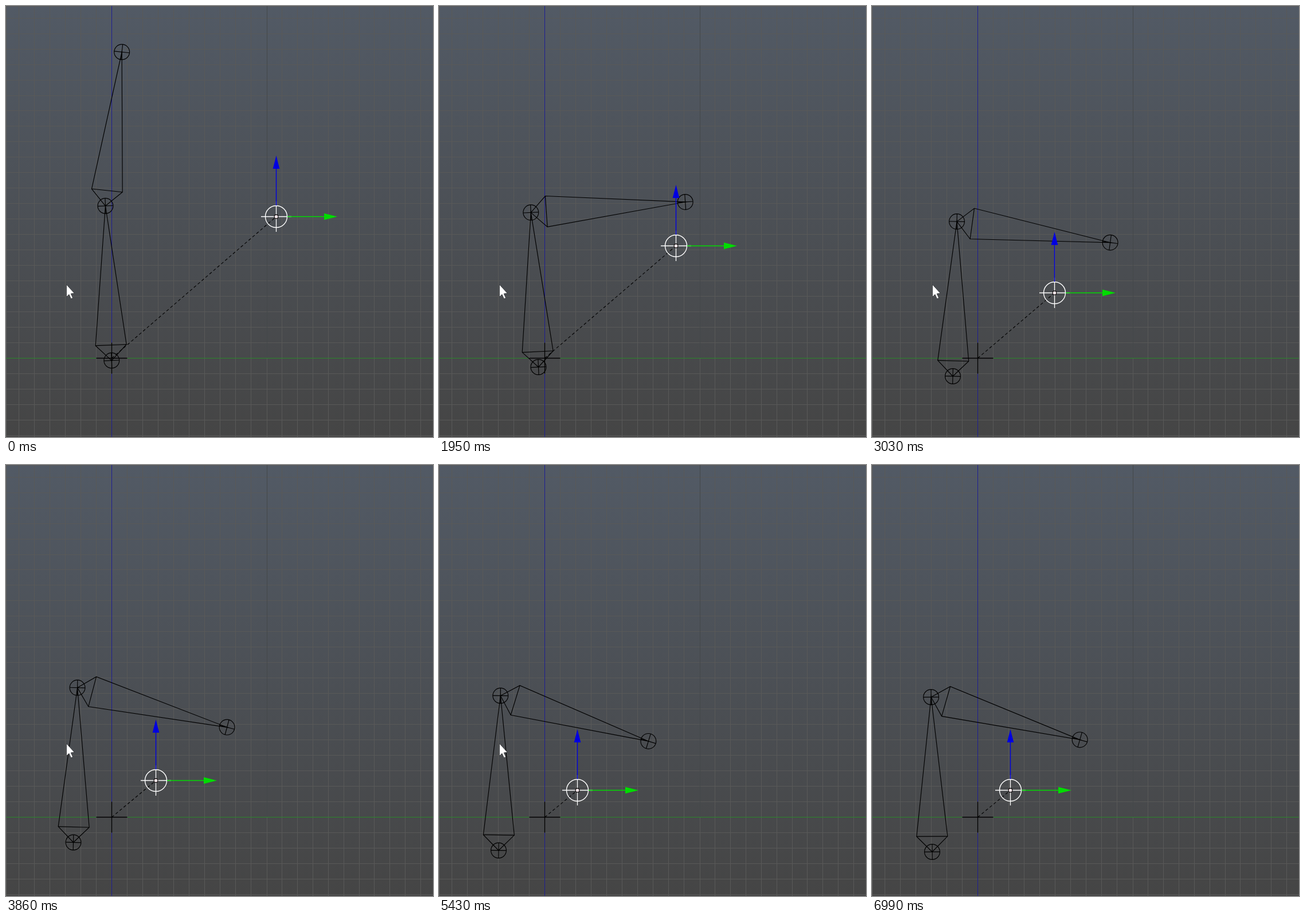
An HTML page with a canvas for the animation above (7.09 s loop, 745 px wide and 752 px high).

```html
<!DOCTYPE html>
<html lang="en">
<head>
<meta charset="utf-8">
<title>Bone chain</title>
<style>
html, body { margin: 0; width: 100%; height: 100%; overflow: hidden; background: #4b4f53; }
canvas { display: block; }
</style>
</head>
<body>
<canvas id="stage" width="745" height="752"></canvas>
<script>
const W = 745, H = 752, LOOP = 7090, LAST = 53;
const OX = 184.5, OY = 614.5, CELL = 26.97, BONE = 270, RING = 13.4;
const INK = '#000', BLUE = '#0000e0', GREEN = '#00dc00', GRID = '#595958';
const ctx = document.getElementById('stage').getContext('2d');

// Key poses: step, root x, root y, lower and upper angle in degrees from up
const KEYS = [
  [0, 184.3, 618.5, -2.3, 6.1],
  [5, 176.5, 625.5, -14.1, 70.4],
  [11, 173.5, 630, -2.8, 86.1],
  [20, 141, 646, 1.5, 97.8],
  [27, 117.5, 658.5, 1.5, 104.8],
  [40, 104, 672.5, 0.7, 107.1],
  [LAST, 105, 675, -0.4, 106]
];

// The picture rests, then advances in steps that slow down a little
function stepAt(t) {
  const n = t < 1950 ? 1 + (t - 810) / 114 : 11 + (t - 1950) / 119.3;
  return Math.max(0, Math.min(LAST, Math.floor(n)));
}

// Smooth cubic through the key poses
function poseAt(n) {
  const i = Math.max(1, KEYS.findIndex(k => k[0] >= n));
  const a = KEYS[i - 1], b = KEYS[i];
  const before = KEYS[i - 2] || a, after = KEYS[i + 1] || b;
  const span = b[0] - a[0], u = (n - a[0]) / span, v = 1 - u;
  const pose = a.map((_, c) => {
    const m0 = (b[c] - before[c]) / (b[0] - before[0]);
    const m1 = (after[c] - a[c]) / (after[0] - a[0]);
    return a[c] * v * v * (1 + 2 * u) + b[c] * u * u * (3 - 2 * u)
      + span * u * v * (m0 * v - m1 * u);
  });
  pose[2] += 26 * Math.exp(-((n - 2.5) ** 2)); // the root dips as the chain drops
  return pose.slice(1);
}

// Ease in and out along a cubic curve with handles at .39 and .61
function ease(x) {
  let lo = 0, hi = 1;
  for (let i = 0; i < 24; i++) {
    const t = (lo + hi) / 2, s = 1 - t;
    if (1.17 * t * s * s + 1.83 * t * t * s + t * t * t < x) lo = t; else hi = t;
  }
  return lo * lo * (3 - 2 * lo);
}

const snap = v => Math.floor(v) + 0.5;

function targetAt(n) {
  const e = ease(Math.min(1, (n + 0.72) / 34.4));
  return [snap(471.4 - 229.6 * e), snap(367.7 + 200 * e)];
}

function trace(pts) {
  ctx.beginPath();
  pts.forEach(([x, y]) => ctx.lineTo(x, y));
}

function line(color, width, ...pts) {
  ctx.strokeStyle = color;
  ctx.lineWidth = width;
  trace(pts);
  ctx.stroke();
}

function fill(color, ...pts) {
  ctx.fillStyle = color;
  trace(pts);
  ctx.fill();
}

function circle(x, y, r, color, width, inside) {
  ctx.beginPath();
  ctx.arc(x, y, r, 0, Math.PI * 2);
  if (inside) { ctx.fillStyle = inside; ctx.fill(); }
  ctx.strokeStyle = color;
  ctx.lineWidth = width;
  ctx.stroke();
}

function cross(x, y, r, color, width, angle = 0) {
  const c = Math.cos(angle) * r, s = Math.sin(angle) * r;
  line(color, width, [x - c, y - s], [x + c, y + s]);
  line(color, width, [x + s, y - c], [x - s, y + c]);
}

const sky = ctx.createLinearGradient(0, 0, 0, H);
sky.addColorStop(0, '#525a65');
sky.addColorStop(1, '#454545');

function backdrop() {
  ctx.fillStyle = sky;
  ctx.fillRect(0, 0, W, H);
  const vline = (x, c) => line(c, 1, [x, 0], [x, H]);
  const hline = (y, c) => line(c, 1, [0, y], [W, y]);
  for (let k = -22; k <= 20; k++) {
    if (k === 0) continue;
    if (k !== 10) vline(snap(OX + k * CELL), GRID);
    hline(snap(OY + k * CELL), GRID);
  }
  vline(0.5, GRID);
  hline(0.5, GRID);
  vline(455.5, GRID);
  line('#44484a', 1, [455.5, 0], [455.5, OY]);
  hline(OY, '#2a862a');
  vline(OX, '#1e1e92');
}

function ring([x, y], angle) {
  circle(x, y, RING, INK, 1.15);
  cross(x, y, RING, INK, 1.15, angle);
}

// Draws one bone and returns its tip
function bone([x, y], angle) {
  const dx = Math.sin(angle) * BONE, dy = -Math.cos(angle) * BONE;
  const tip = [x + dx, y + dy];
  const cx = x + dx / 10, cy = y + dy / 10;
  const a = [cx + dy / 10, cy - dx / 10], b = [cx - dy / 10, cy + dx / 10];
  line(INK, 1.15, [x, y], a, tip, b, [x, y]);
  line(INK, 1.15, a, b);
  ring(tip, angle);
  return tip;
}

function arrow(x, y, angle, color) {
  ctx.save();
  ctx.translate(x, y);
  ctx.rotate(angle);
  line(color, 1.4, [19.5, 0], [84, 0]);
  fill(color, [83.5, -5.8], [83.5, 5.8], [106.5, 0]);
  ctx.restore();
}

function gizmo(x, y) {
  cross(x, y, 26.5, '#fff', 1.3);
  circle(x, y, 19, '#fff', 1.4);
  arrow(x, y, -Math.PI / 2, BLUE);
  arrow(x, y, 0, GREEN);
  circle(x, y, 3.4, INK, 1.1, '#f6e4e8');
}

function pointer(x, y) {
  const shape = [[0, 0], [0, 21.5], [4.5, 17.3], [7.9, 24.8], [11.1, 23.4], [7.7, 16], [13.8, 15.3], [0, 0]]
    .map(([px, py]) => [x + px, y + py]);
  fill('#fff', ...shape);
  line('#303336', 0.8, ...shape);
}

function draw(time) {
  const n = stepAt(time), rad = Math.PI / 180;
  const [x, y, low, high] = poseAt(n);
  const target = targetAt(n);
  backdrop();
  ctx.setLineDash([5, 4]);
  line(INK, 1.1, [OX, OY], target);
  ctx.setLineDash([]);
  cross(OX, OY, 27, INK, 1.3);
  ring([x, y], low * rad);
  bone(bone([x, y], low * rad), high * rad);
  gizmo(...target);
  // The pointer flicks upward and leaves at the end
  if (n < LAST) pointer(105.5, 486 - 137 * Math.max(0, n - LAST + 2));
}

function tick() {
  draw(performance.now() % LOOP);
  requestAnimationFrame(tick);
}
tick();
</script>
</body>
</html>
```
